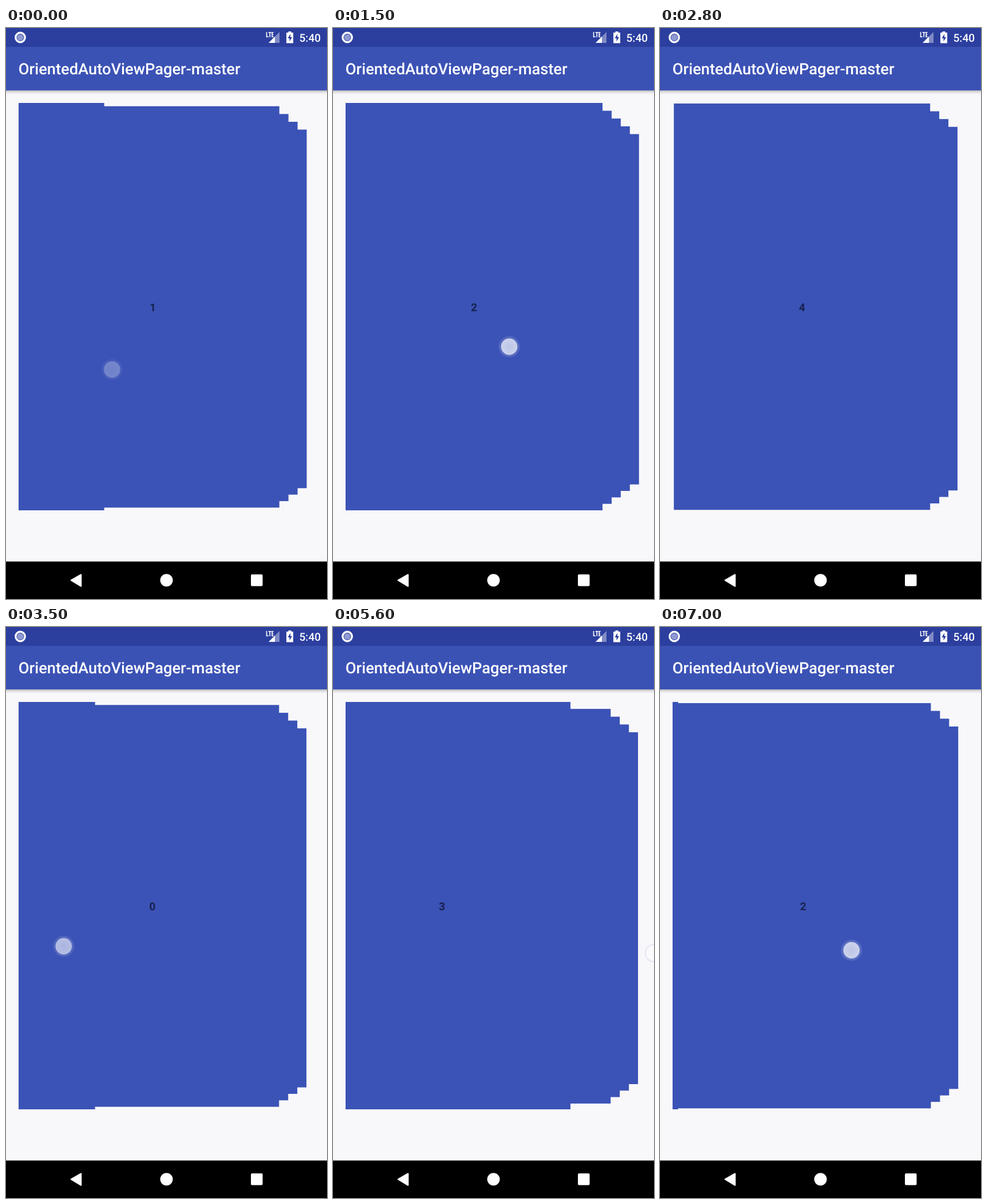
Recreate the animation shown at these times as an HTML page. Size 561 by 998 pixels, loop 7100 ms.

```html
<!DOCTYPE html>
<html lang="en">
<head>
<meta charset="utf-8">
<title>Stacked pager</title>
<style>
  html, body { margin: 0; width: 100%; height: 100%; overflow: hidden; background: #f8f7fa; }
  svg { display: block; width: 561px; height: 998px; font-family: Roboto, sans-serif; font-weight: 500; text-rendering: geometricPrecision; }
  .card rect { fill: #3b53b6; }
  .card text { fill: #17214f; font-size: 19px; font-weight: 700; text-anchor: middle; }
</style>
</head>
<body>
<svg viewBox="0 0 561 998">
  <defs>
    <linearGradient id="shade" x2="0" y2="1">
      <stop offset="0" stop-color="#000" stop-opacity=".28"/>
      <stop offset=".4" stop-color="#000" stop-opacity=".1"/>
      <stop offset="1" stop-color="#000" stop-opacity="0"/>
    </linearGradient>
    <radialGradient id="glow">
      <stop offset=".7" stop-color="#fff" stop-opacity=".3"/>
      <stop offset="1" stop-color="#fff" stop-opacity="0"/>
    </radialGradient>
    <radialGradient id="disc">
      <stop offset="0" stop-color="#fff" stop-opacity=".52"/>
      <stop offset="1" stop-color="#fff" stop-opacity=".63"/>
    </radialGradient>
    <clipPath id="pager"><rect x="22" y="109" width="539" height="823"/></clipPath>
  </defs>

  <rect width="561" height="998" fill="#f8f7fa"/>
  <g id="deck" clip-path="url(#pager)"></g>

  <rect y="109" width="561" height="7" fill="url(#shade)"/>
  <rect y="33" width="561" height="76" fill="#3b52b5"/>
  <rect width="561" height="33" fill="#2c3f9f"/>
  <text x="21.8" y="81" font-size="27.27" fill="#fff">OrientedAutoViewPager-master</text>

  <circle cx="25" cy="16.5" r="8.2" fill="#2c3f9f" stroke="#fff" stroke-width="3.4"/>
  <circle cx="25" cy="16.5" r="5.6" fill="#8f9ad3"/>
  <path d="M455.5 7v8.4h3.2M458.6 7.8h5.2M461.2 7v9M467.6 7.8h-2.5v7.6h2.5M465 11.5h2.4" fill="none" stroke="#fff" stroke-width="1.6"/>
  <path d="M478 7v19h-19z" fill="#fff" opacity=".4"/>
  <path d="M470 15v11h-11z" fill="#fff"/>
  <path d="M493.5 6h5v2h3.5v18.5h-12V8h3.5z" fill="#fff"/>
  <path d="M497 10.5l-4.500 7.500h3v5.500l4.500-7.500h-3z" fill="#2c3f9f"/>
  <text x="512.5" y="24" font-size="19.1" fill="#fff">5:40</text>

  <rect y="932.5" width="561" height="65.5" fill="#000"/>
  <g fill="#fff">
    <path d="M114 965.3L131 955.5V975.5z" stroke="#fff" stroke-width="2.5" stroke-linejoin="round"/>
    <circle cx="280.5" cy="965.3" r="11"/>
    <rect x="428" y="955" width="20.5" height="20.5" rx="2"/>
  </g>

  <g id="touch">
    <circle r="19.5" fill="url(#glow)"/>
    <circle r="14.4" fill="url(#disc)"/>
    <circle r="15" fill="none" stroke="#3c51b5" stroke-opacity=".32" stroke-width="1.6"/>
  </g>
</svg>
<script>
const LOOP = 7100, STEP = 100;
const PAGE = 517, SLOP = 25, SPEED = 0.96, SETTLE = 500, FADE = 100;
const SLOTS = 5, PAGES = 5;

// Each swipe: press time, hold time, start point
const swipes = [
  [-195, 135, 315, 597],
  [700, 300, 519, 574],
  [1500, 260, 308, 557],
  [2405, 215, 519, 566],
  [3165, 320, 408, 558],
  [4200, 345, 219, 576],
  [5086, 454, 125, 570],
  [5900, 380, 91, 570],
  [6893, 340, 232, 565]
];

const clamp = v => Math.min(1, Math.max(0, v));
const mix = (a, b, u) => a + (b - a) * u;

const deck = document.getElementById('deck');
const touch = document.getElementById('touch');
const cards = [];
for (let k = 0; k < SLOTS; k++) {
  deck.insertAdjacentHTML('afterbegin',
    '<g class="card"><rect x="-224.5" y="-356" width="449" height="712"/><text y="7.8"></text></g>');
  cards.push(deck.firstChild);
}

// The front card slides left; those behind shrink and peek out to the right
function place(card, d) {
  const back = Math.max(0, d);
  const x = 246.5 + (d < 0 ? d * PAGE : d * 23.8);
  const y = 487 + back * 1.15;
  card.setAttribute('transform', `translate(${x} ${y}) scale(${1 - back * 0.035})`);
}

function draw(t) {
  const i = swipes.findLastIndex(([down]) => down <= t);
  const [down, hold, x0, y] = swipes[i];
  const dir = i < PAGES ? 1 : -1;
  const from = dir > 0 ? i : 2 * PAGES - i;

  const moved = SPEED * Math.min(t - down, hold);
  const x = x0 - dir * moved;
  const free = Math.max(0, t - down - hold);
  const drag = Math.max(0, moved - SLOP) / PAGE;
  const ease = 1 - (1 - clamp(free / SETTLE)) ** 5;
  const pos = from + dir * mix(drag, 1, ease);

  const first = Math.floor(pos);
  cards.forEach((card, k) => {
    place(card, first + k - pos);
    card.lastChild.textContent = (first + k) % PAGES;
  });

  touch.setAttribute('transform', `translate(${x} ${y})`);
  touch.setAttribute('opacity', clamp(1 - free / FADE));
}

const start = performance.now();
function tick() {
  const t = (performance.now() - start) % LOOP;
  draw(Math.floor(t / STEP) * STEP);
  requestAnimationFrame(tick);
}
tick();
</script>
</body>
</html>
```
